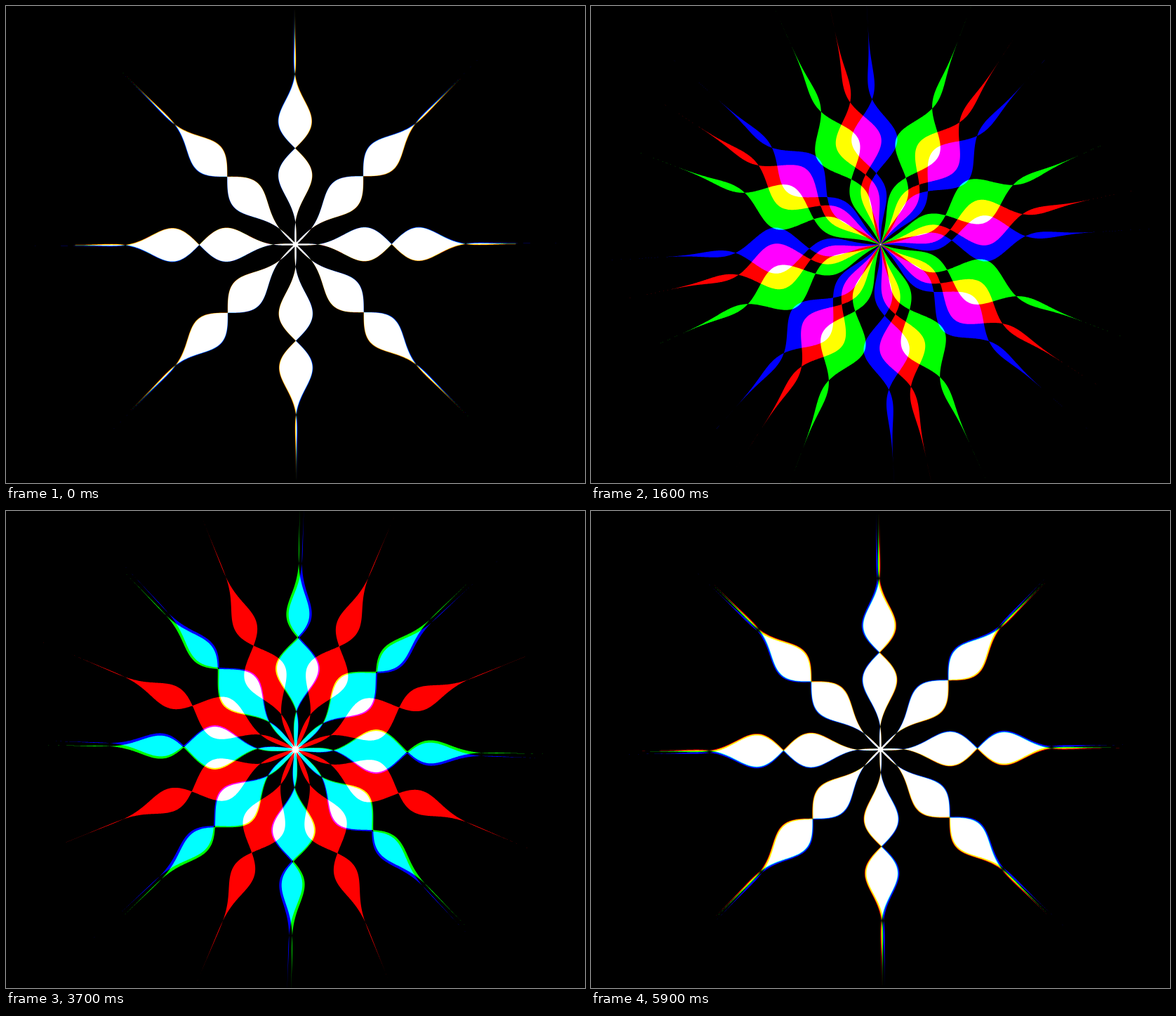
An HTML page with a canvas that plays this animation: 825 by 679 pixels, repeating every 6 s.

```html
<!DOCTYPE html>
<html lang="en">
<head>
<meta charset="utf-8">
<title>Wave flower</title>
<style>
  html, body { margin: 0; width: 100%; height: 100%; overflow: hidden; background: #000; }
  canvas { display: block; }
</style>
</head>
<body>
<canvas id="stage" width="825" height="679"></canvas>
<script>
const ctx = document.getElementById('stage').getContext('2d');
const LOOP = 6000, STEP = 100;
const CX = 412.5, CY = 339.5;
const RAYS = 8, REACH = 420;

// Wave packet along each ray
const AMPLITUDE = 34, HALF_WAVE = 105.5, MIDDLE = 136.5, SPREAD = 5774;
const MAX_TURN = 0.4, MAX_SHIFT = 133.8;

// Each colour turns twice as far as the one before
const LAYERS = [['#f00', 1], ['#0f0', 2], ['#00f', 4]];

// Seconds and progress of the swing out and back
const KEYS = [
  [0, .004], [.4, .023], [.8, .104], [1.2, .265], [1.6, .527], [2.2, .855],
  [2.9, .997], [3.2, 1], [3.7, .96], [4.4, .743], [4.75, .485], [5.1, .21],
  [5.5, .07], [5.9, .012], [6, .004]
];

const secant = i => (KEYS[i + 1][1] - KEYS[i][1]) / (KEYS[i + 1][0] - KEYS[i][0]);

// Harmonic mean of neighbouring slopes keeps the curve free of overshoot
const slopes = KEYS.map((key, i) => {
  if (i === 0 || i === KEYS.length - 1) return 0;
  const a = secant(i - 1), b = secant(i);
  return a * b > 0 ? 2 * a * b / (a + b) : 0;
});

function swing(t) {
  let i = 0;
  while (i < KEYS.length - 2 && t >= KEYS[i + 1][0]) i++;
  const [t0, v0] = KEYS[i], [t1, v1] = KEYS[i + 1];
  const h = t1 - t0, x = (t - t0) / h, y = 1 - x;
  return y * y * (1 + 2 * x) * v0 + x * x * (1 + 2 * y) * v1
    + h * x * y * (y * slopes[i] - x * slopes[i + 1]);
}

function halfWidth(r, node) {
  const d = r - MIDDLE;
  return AMPLITUDE * Math.abs(Math.sin(Math.PI * (r - node) / HALF_WAVE)) * Math.exp(-d * d / SPREAD);
}

function petal(node) {
  const path = new Path2D();
  path.moveTo(0, 0);
  for (let r = 0; r <= REACH; r++) path.lineTo(r, halfWidth(r, node));
  for (let r = REACH; r >= 0; r--) path.lineTo(r, -halfWidth(r, node));
  path.closePath();
  return path;
}

function draw(ms) {
  const u = swing(ms / 1000);
  const shape = petal(MIDDLE + MAX_SHIFT * u);
  ctx.setTransform(1, 0, 0, 1, 0, 0);
  ctx.globalCompositeOperation = 'source-over';
  ctx.fillStyle = '#000';
  ctx.fillRect(0, 0, 825, 679);
  ctx.globalCompositeOperation = 'lighter';
  for (const [color, speed] of LAYERS) {
    ctx.fillStyle = color;
    ctx.setTransform(1, 0, 0, 1, CX, CY);
    ctx.rotate(-MAX_TURN * u * speed);
    for (let i = 0; i < RAYS; i++) {
      ctx.fill(shape);
      ctx.rotate(2 * Math.PI / RAYS);
    }
  }
}

const start = performance.now();
function tick() {
  const ms = (performance.now() - start) % LOOP;
  draw(Math.floor(ms / STEP) * STEP);
  requestAnimationFrame(tick);
}
tick();
</script>
</body>
</html>
```
